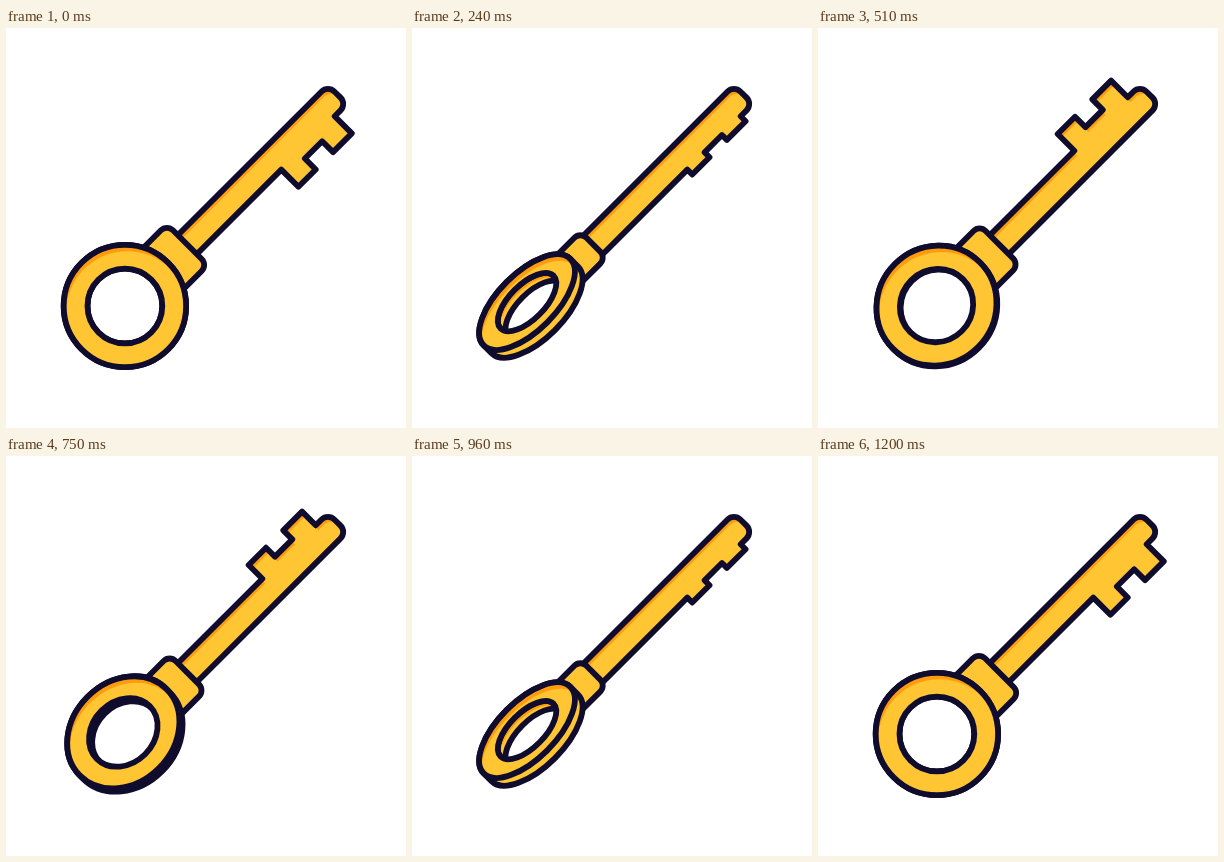
Recreate the animation shown at these times as an HTML page with a canvas. Size 400 by 400 pixels, loop 1.29 s.

```html
<!DOCTYPE html>
<html lang="en">
<head>
<meta charset="utf-8">
<title>Turning key</title>
<style>
  html, body { margin: 0; width: 100%; height: 100%; overflow: hidden; background: #fff; }
  canvas { display: block; }
</style>
</head>
<body>
<canvas width="400" height="400"></canvas>
<script>
const ctx = document.querySelector('canvas').getContext('2d');
const GOLD = '#ffc533', SHADE = '#ff9b0d', INK = '#100c2e';
const LOOP = 1290, STEP = 30, HALF_TURN = 600, LINE = 5.8;

function fill(path, color) {
  ctx.fillStyle = color;
  ctx.fill(path);
}

function paint(path, color) {
  fill(path, color);
  ctx.stroke(path);
}

// Gold shape with a darker rim along its upper-left edge.
function paintShaded(path, dx, dy) {
  ctx.save();
  ctx.clip(path);
  fill(path, SHADE);
  ctx.translate(dx, dy);
  fill(path, GOLD);
  ctx.restore();
  ctx.stroke(path);
}

function ellipse(x, y, rx, ry) {
  const path = new Path2D();
  path.ellipse(x, y, rx, ry, 0, 0, 2 * Math.PI);
  return path;
}

function drawShaft(cos, sin) {
  const side = cos < 0 ? -1 : 1, half = 13.4, tip = 187.3;
  const reach = h => side * Math.max(half, h * Math.abs(cos) + 3.1 * sin);
  const edge = side * half, tooth = reach(37.6), notch = reach(22.2);
  const path = new Path2D();
  path.moveTo(-40, -edge);
  path.arcTo(tip, -edge, tip, edge, 9);
  path.arcTo(tip, edge, 170, edge, 9);
  for (const [x, y] of [
    [170, edge], [170, tooth], [143.5, tooth], [143.5, notch],
    [119, notch], [119, tooth], [94.5, tooth], [94.5, edge], [-40, edge]
  ]) path.lineTo(x, y);
  path.closePath();
  paintShaded(path, -1.5, 5.4);
}

function drawCollar(cos, sin) {
  const half = Math.hypot(28.8 * cos, 14 * sin);
  const path = new Path2D();
  path.roundRect(-90, -half, 65, 2 * half, 8.5);
  paint(path, GOLD);
}

function drawRing(cos, sin) {
  const x = -112.5, y = -0.8, depth = 7 * sin * sin, flat = Math.max(Math.abs(cos), 0.01);
  const outer = 61.2, inner = 37.4;

  const body = new Path2D();
  body.ellipse(x, y - depth, outer, outer * flat, 0, Math.PI, 2 * Math.PI);
  body.ellipse(x, y + depth, outer, outer * flat, 0, 0, Math.PI);
  body.closePath();
  paint(body, GOLD);
  paintShaded(ellipse(x, y - depth, outer, outer * flat), -2.8, 6.2);

  const hole = ellipse(x, y - depth, inner, inner * flat);
  ctx.save();
  ctx.clip(hole);
  paintShaded(hole, -1.5, 5);
  paint(ellipse(x, y + depth, inner, inner * flat), '#fff');
  ctx.restore();
  ctx.stroke(hole);
}

// Half a turn and back, eased at both ends.
function angleAt(time) {
  const p = 1 - Math.abs(time - HALF_TURN) / HALF_TURN, q = 1 - p;
  return Math.PI * (0.15 * q * q * p + 2.7 * q * p * p + p ** 3);
}

function draw(now) {
  const step = Math.floor(now % LOOP / STEP) * STEP;
  const angle = angleAt(Math.min(step, 2 * HALF_TURN));
  const cos = Math.cos(angle), sin = Math.sin(angle);
  ctx.setTransform(1, 0, 0, 1, 0, 0);
  ctx.clearRect(0, 0, 400, 400);
  ctx.translate(199, 199);
  ctx.rotate(-Math.PI / 4);
  ctx.strokeStyle = INK;
  ctx.lineWidth = LINE;
  ctx.lineJoin = 'round';
  drawShaft(cos, sin);
  drawCollar(cos, sin);
  drawRing(cos, sin);
}

const start = performance.now();
function tick() {
  draw(performance.now() - start);
  requestAnimationFrame(tick);
}
tick();
</script>
</body>
</html>
```
